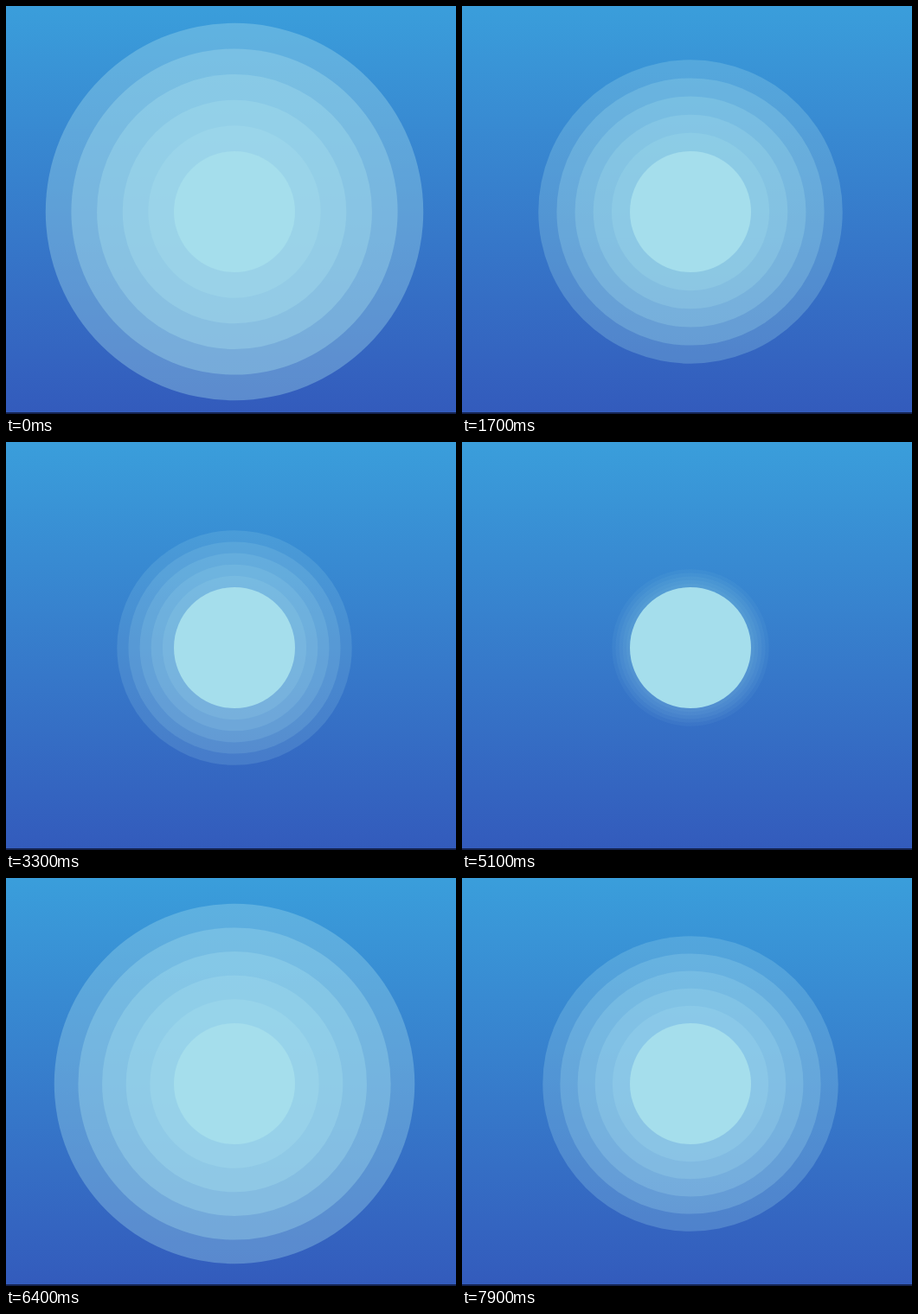
An HTML page that plays this animation: 520x472 px, repeating every 8 s.

```html
<!DOCTYPE html>
<html lang="en">
<head>
<meta charset="utf-8">
<title>Pulsing rings</title>
<style>
  html, body { margin: 0; width: 100%; height: 100%; overflow: hidden; }
  svg { display: block; width: 520px; height: 472px; }
</style>
</head>
<body>
<svg viewBox="0 0 520 472">
  <defs>
    <linearGradient id="sky" x1="0" y1="0" x2="0" y2="1">
      <stop offset="0" stop-color="#3a9edb"/>
      <stop offset="1" stop-color="#335bbc"/>
    </linearGradient>
  </defs>
  <rect width="520" height="470" fill="url(#sky)"/>
  <rect y="470" width="520" height="2" fill="#14234f"/>
  <g id="rings" fill="#a5deec"></g>
  <circle cx="264" cy="238" r="70" fill="#a5deec"/>
</svg>
<script>
  const LOOP = 8000, STEP = 100, PULSE = 6000, PHASE = 70;
  const DISC = 70, SPREAD = 30, ALPHA = 0.36, COUNT = 5;
  const group = document.getElementById('rings');

  const rings = Array.from({ length: COUNT }, () => {
    const ring = document.createElementNS('http://www.w3.org/2000/svg', 'circle');
    ring.setAttribute('cx', 264);
    ring.setAttribute('cy', 238);
    return group.appendChild(ring);
  });

  // Rings shrink into the disc and fade, then snap back out.
  function draw(ms) {
    const time = Math.floor((ms % LOOP) / STEP) * STEP;
    const left = 1 - ((time + PHASE) % PULSE) / PULSE;
    rings.forEach((ring, i) => {
      ring.setAttribute('r', DISC + SPREAD * (i + 1) * left);
      ring.setAttribute('fill-opacity', ALPHA * left);
    });
  }

  const start = performance.now();
  function tick() {
    draw(performance.now() - start);
    requestAnimationFrame(tick);
  }
  tick();
</script>
</body>
</html>
```
